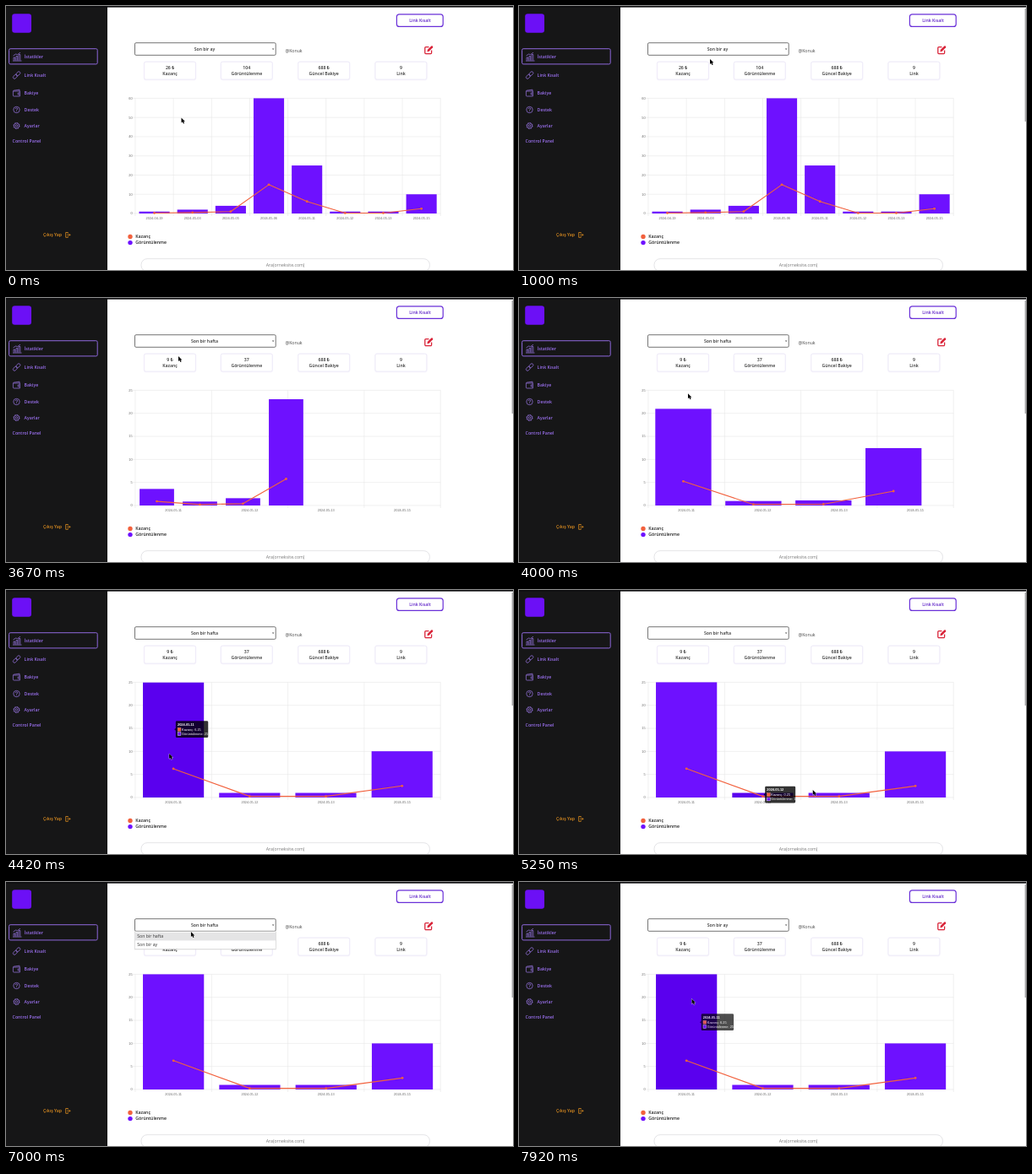
These frames come from a looping animation (600x313 px, 8 s). An HTML page:

```html
<!DOCTYPE html>
<html lang="tr">
<head>
<meta charset="utf-8">
<title>Link paneli</title>
<style>
  html, body { margin: 0; width: 100%; height: 100%; overflow: hidden; background: #fff; }
  svg { display: block; width: 100vw; height: 100vh; }
  text { font-family: "Open Sans", "Noto Sans", sans-serif; font-size: 5.2px; }
  .chart text { font-family: "Liberation Sans", Arial, sans-serif; font-size: 3.9px; }
</style>
</head>
<body>
<svg id="stage" viewBox="0 0 600 313"></svg>
<script>
const LOOP = 8000;
const PURPLE = '#6e11ff', DEEP = '#5a00ee', ORANGE = '#f2613d', LILAC = '#9a70ee';
const stage = document.getElementById('stage');

function add(parent, tag, attrs = {}) {
  const el = document.createElementNS('http://www.w3.org/2000/svg', tag);
  set(el, attrs);
  parent.append(el);
  return el;
}
function set(el, attrs) {
  for (const key in attrs) el.setAttribute(key, attrs[key]);
}
const group = (parent, attrs) => add(parent, 'g', attrs);
const rect = (parent, x, y, width, height, attrs) =>
  add(parent, 'rect', { x, y, width, height, ...attrs });
const path = (parent, d, attrs) => add(parent, 'path', { d, fill: 'none', ...attrs });
const circle = (parent, cx, cy, r, attrs) => add(parent, 'circle', { cx, cy, r, ...attrs });
// y is the vertical middle of the text
function label(parent, x, y, string, attrs) {
  const el = add(parent, 'text', { x, y: y + 1.8, fill: '#333', 'font-weight': 600, ...attrs });
  el.textContent = string;
  return el;
}
const middle = { 'text-anchor': 'middle' };
const show = (el, on) => { el.style.display = on ? '' : 'none'; };
const clamp = v => Math.min(1, Math.max(0, v));
const mix = (a, b, p) => a + (b - a) * p;
const outQuart = v => 1 - (1 - clamp(v)) ** 4;

// Sidebar
rect(stage, 0, 0, 600, 313, { fill: '#fff' });
rect(stage, 0, 0, 120, 313, { fill: '#161617' });
rect(stage, 0, 0, 600, 1.6, { fill: '#0d0d0f' });
rect(stage, 7.2, 9.2, 22.8, 22.6, { rx: 3.2, fill: '#6c10f6' });
rect(stage, 3.6, 50.7, 104.6, 18.2, { rx: 1.6, fill: 'none', stroke: '#8e68dc', 'stroke-width': 1 });
[['İstatikler', 60], ['Link Kısalt', 82], ['Bakiye', 103], ['Destek', 123], ['Ayarlar', 142]]
  .forEach(([name, y]) => label(stage, 21.6, y, name, { fill: LILAC }));
label(stage, 7.6, 160, 'Control Panel', { fill: LILAC });

const icons = group(stage, { fill: 'none', stroke: '#9270d8', 'stroke-width': .75 });
path(icons, 'M8 65H18.5M9 64.5V61H10.7V64.5M12 64.5V59.5H13.7V64.5M15 64.5V57.5H16.8V64.5M8.5 59L11.5 57L13.5 57.6L17 55.2');
const chain = group(icons, { transform: 'translate(12.6 82) rotate(-45)' });
rect(chain, -5.3, -1.7, 5.6, 3.4, { rx: 1.7 });
rect(chain, -.3, -1.7, 5.6, 3.4, { rx: 1.7 });
path(icons, 'M16 101V99.2L9 100.2Q8.4 100.5 8.4 101V106Q8.4 107 9.4 107H16.4V101H8.8M16.4 103H14.2V105H16.4');
circle(icons, 12.5, 123, 3.7);
path(icons, 'M11.3 122Q11.4 120.8 12.5 120.8T13.7 122Q13.6 122.7 12.5 123.3V124M12.5 124.7V125.4');
circle(icons, 12.5, 142, 1.3);
circle(icons, 12.5, 142, 3.1);
circle(icons, 12.5, 142, 3.6, { 'stroke-dasharray': '1.4 1.427' });

label(stage, 44, 271.3, 'Çıkış Yap', { fill: '#dd8d20' });
path(stage, 'M73.3 269.8V268.5H70.7V274.3H73.3V273M72.3 271.4H76M74.8 270.1L76 271.4L74.8 272.7',
  { stroke: '#dd8d20', 'stroke-width': .8 });

// Header
rect(stage, 462.4, 9.8, 54.8, 14.6, { rx: 3, fill: '#fff', stroke: '#6a30d8', 'stroke-width': 1.2 });
label(stage, 490, 17, 'Link Kısalt', { ...middle, fill: '#5f22c8' });
rect(stage, 152.5, 43.7, 166.7, 14.6, { rx: 1.4, fill: '#fff', stroke: '#666', 'stroke-width': .9 });
const choice = label(stage, 235, 51, '', middle);
path(stage, 'M314.9 50.5H317.3L316.1 51.9Z', { fill: '#444' });
label(stage, 330.5, 53, '@Konuk', { fill: '#444', 'font-weight': 400 });
path(stage, 'M500.5 48.6H496.8Q495.8 48.6 495.8 49.6V55.6Q495.8 56.6 496.8 56.6H502.6Q503.6 56.6 503.6 55.6V52.4',
  { stroke: '#d92338', 'stroke-width': 1.3 });
path(stage, 'M498.4 54.2L498.9 51.8L503.3 47.4Q504 46.8 504.8 47.6T505 49.3L500.7 53.7Z', { fill: '#d92338' });

const stats = [[163.6, 'Kazanç'], [254.4, 'Görüntülenme'], [345.8, 'Güncel Bakiye'], [437, 'Link']]
  .map(([x, name]) => {
    rect(stage, x - .8, 65.4, 62.4, 22.8, { rx: 2.8, fill: '#f6f4fc' });
    rect(stage, x, 66.2, 60.8, 20.8, { rx: 2, fill: '#fff', stroke: '#ebe7f6', 'stroke-width': .8 });
    label(stage, x + 30.4, 80, name, middle);
    return label(stage, x + 30.4, 73, '', middle);
  });

// Chart
const LEFT = 153, WIDTH = 361.2, TOP = 109.4, BASE = 246;
const chart = group(stage, { class: 'chart' });
const RATE = .25;

function makeSet(max, step, days, views) {
  const grid = group(chart, {});
  const col = WIDTH / days.length;
  const yOf = v => BASE - (BASE - TOP) * v / max;
  const lines = { stroke: '#e6e6e6', 'stroke-width': .6 };
  for (let v = 0; v <= max; v += step) {
    path(grid, `M150 ${yOf(v)}H${LEFT + WIDTH}`, lines);
    label(grid, 149.6, yOf(v) - .4, v, { 'text-anchor': 'end', fill: '#666', 'font-weight': 400 });
  }
  for (let i = 0; i <= days.length; i++) path(grid, `M${LEFT + col * i} ${TOP}V249`, lines);
  const marks = days.map((day, i) => {
    const x = LEFT + col * (i + .5);
    label(grid, x, 251, '2024-' + day, { ...middle, fill: '#666', 'font-weight': 400 });
    return { x, w: col * .8, bar: yOf(views[i]), dot: yOf(views[i] * RATE) };
  });
  return { grid, marks, days, views };
}
const month = makeSet(60, 10,
  ['04-19', '05-03', '05-05', '05-06', '05-11', '05-12', '05-13', '05-15'],
  [1, 2, 4, 60, 25, 1, 1, 10]);
const week = makeSet(25, 5, ['05-11', '05-12', '05-13', '05-15'], [25, 1, 1, 10]);

const bars = month.marks.map(() => rect(chart, 0, 0, 0, 0, {}));
const trend = path(chart, '', { stroke: ORANGE, 'stroke-width': 1.1, 'stroke-linejoin': 'round' });
const dots = month.marks.map(() => circle(chart, 0, 0, 1.4, { fill: ORANGE }));

[[273.5, ORANGE, 'Kazanç'], [280.6, PURPLE, 'Görüntülenme']].forEach(([y, fill, name]) => {
  circle(stage, 147, y, 2.7, { fill });
  label(stage, 153.3, y, name, { fill: '#222' });
});
rect(stage, 160, 299.7, 341.4, 15, { rx: 7, fill: '#fff', stroke: '#dcdce0', 'stroke-width': .8 });
label(stage, 330.6, 306.7, 'Ara(orneksite.com)', { ...middle, fill: '#777', 'font-weight': 400 });
const scroll = rect(stage, 598.6, 3, 1.4, 134, { fill: '#a9a9ab' });

// Tooltip
const tip = group(stage, { class: 'chart' });
const tipBox = rect(tip, 0, 0, 38.4, 19.8, { rx: 1.4, fill: '#000', 'fill-opacity': .8 });
const caret = path(tip, '', { fill: '#000', 'fill-opacity': .8 });
const white = { fill: '#fff', 'font-weight': 400 };
const tipTitle = label(tip, 2.2, 3.6, '', { ...white, 'font-weight': 700 });
rect(tip, 2.3, 8.1, 3.8, 3.8, { fill: ORANGE, stroke: '#f7a08a', 'stroke-width': .4 });
rect(tip, 2.3, 13.4, 3.8, 3.8, { fill: PURPLE, stroke: '#fff', 'stroke-width': .4 });
const tipRows = [label(tip, 7.2, 9.7, '', white), label(tip, 7.2, 15, '', white)];

// Drop-down list
const menu = group(stage, {});
rect(menu, 151.8, 58.8, 168, 21.6, { fill: '#000', 'fill-opacity': .1 });
rect(menu, 152.3, 58.8, 167, 20.8, { fill: '#fff', stroke: '#ccc', 'stroke-width': .5 });
const mark = rect(menu, 152.6, 0, 166.4, 9.6, { fill: '#e4e4e5' });
label(menu, 155.2, 64.4, 'Son bir hafta', { 'font-weight': 400 });
label(menu, 155.2, 73.8, 'Son bir ay', { 'font-weight': 400 });

const pointer = path(stage, 'M0 0V6L1.4 4.8L2.4 7L3.6 6.5L2.6 4.4H4.4Z',
  { fill: '#000', stroke: '#fff', 'stroke-width': .6, 'paint-order': 'stroke' });

// Timeline: [time, x, y]
const route = [
  [0, 207.5, 132.5], [350, 207.5, 132.5], [800, 222, 85], [1100, 228, 52], [1450, 226, 52],
  [1850, 204, 63.5], [3500, 204, 63.5], [3670, 204, 69], [3850, 203, 76], [4150, 197, 150],
  [4420, 193, 194], [4700, 235, 225], [4860, 262, 242], [5250, 347.5, 237], [5400, 382, 242],
  [5600, 445, 228], [5800, 462, 224], [5940, 432, 240], [6020, 392, 241], [6080, 360, 104.5],
  [6350, 290, 68], [6650, 232, 52], [6900, 226, 52], [7200, 205, 73], [7480, 203, 74],
  [7735, 204, 111], [7920, 204.5, 138.5], [8000, 204.5, 142]
];
const opened = [[1400, 3600], [6800, 7450]];
const SWITCH = 3637;

// Hovered bar from each time on; -1 is none
const hovers = [
  [4150, 0, 155.3], [4440, 0], [4720, -1], [4860, 1], [5330, 2],
  [5480, 3], [6022, 2], [6090, -1], [7735, 0]
];
const tipWidth = i => week.views[i] > 9 ? 38.4 : 36;
function tipSpot(i) {
  const m = week.marks[i];
  return [i < 2 ? m.x + 2.7 : m.x - 2.7 - tipWidth(i), (m.bar + m.dot) / 2 - 9.9];
}

function tipAt(t) {
  let x, y, bar = -1, item = 0, alpha = 0;
  for (let i = 0; i < hovers.length && hovers[i][0] <= t; i++) {
    const [start, next, fixedY] = hovers[i];
    const until = i + 1 < hovers.length ? Math.min(t, hovers[i + 1][0]) : t;
    const span = until - start;
    bar = next;
    alpha = clamp(alpha + (bar < 0 ? -span : span) / 215);
    if (bar < 0) continue;
    item = bar;
    let [tx, ty] = tipSpot(bar);
    ty = fixedY || ty;
    const p = outQuart(span / 400);
    x = x === undefined ? tx : mix(x, tx, p);
    y = y === undefined ? ty : mix(y, ty, p);
  }
  return { x, y, bar, item, alpha };
}

function along(t) {
  const i = Math.max(1, route.findIndex(r => r[0] > t));
  const [a, b] = [route[i - 1], route[i]];
  const p = clamp((t - a[0]) / (b[0] - a[0]));
  return [mix(a[1], b[1], p), mix(a[2], b[2], p)];
}

function drawChart(t, hovered) {
  const weekly = t >= SWITCH;
  const data = weekly ? week : month;
  const p = outQuart((t - SWITCH) / 1000);
  show(month.grid, !weekly);
  show(week.grid, weekly);
  const points = [];
  bars.forEach((bar, i) => {
    const to = data.marks[i], from = month.marks[i];
    show(bar, to);
    show(dots[i], to);
    if (!to) return;
    const at = key => mix(from[key], to[key], p);
    const x = at('x'), w = at('w'), top = at('bar'), cy = at('dot');
    set(bar, { x: x - w / 2, y: top, width: w, height: BASE - top, fill: i === hovered ? DEEP : PURPLE });
    set(dots[i], { cx: x, cy });
    points.push(x + ' ' + cy);
  });
  trend.setAttribute('d', 'M' + points.join('L'));
  const values = weekly ? ['9 ₺', '37'] : ['26 ₺', '104'];
  [...values, '688 ₺', '9'].forEach((v, i) => { stats[i].textContent = v; });
}

function drawTip({ x, y, item, alpha }) {
  show(tip, alpha > 0);
  if (!alpha) return;
  const w = tipWidth(item), views = week.views[item];
  set(tip, { transform: `translate(${x} ${y})`, opacity: alpha });
  tipBox.setAttribute('width', w);
  caret.setAttribute('d', item < 2 ? 'M0 8.4L-1.6 9.9L0 11.4Z' : `M${w} 8.4l1.6 1.5l-1.6 1.5Z`);
  tipTitle.textContent = '2024-' + week.days[item];
  tipRows[0].textContent = 'Kazanç: ' + views * RATE;
  tipRows[1].textContent = 'Görüntülenme: ' + views;
}

function render(t) {
  const tipState = tipAt(t);
  const [x, y] = along(t);
  drawChart(t, tipState.bar);
  drawTip(tipState);
  const weekChosen = t >= opened[0][1] && t < opened[1][1];
  choice.textContent = weekChosen ? 'Son bir hafta' : 'Son bir ay';
  show(menu, opened.some(([a, b]) => t >= a && t < b));
  const first = y > 59 ? y < 69.3 : weekChosen;
  mark.setAttribute('y', first ? 59.8 : 69.6);
  show(scroll, t >= 80);
  pointer.setAttribute('transform', `translate(${x} ${y})`);
}

const begin = performance.now();
function tick() {
  render((performance.now() - begin) % LOOP);
  requestAnimationFrame(tick);
}
tick();
</script>
</body>
</html>
```
